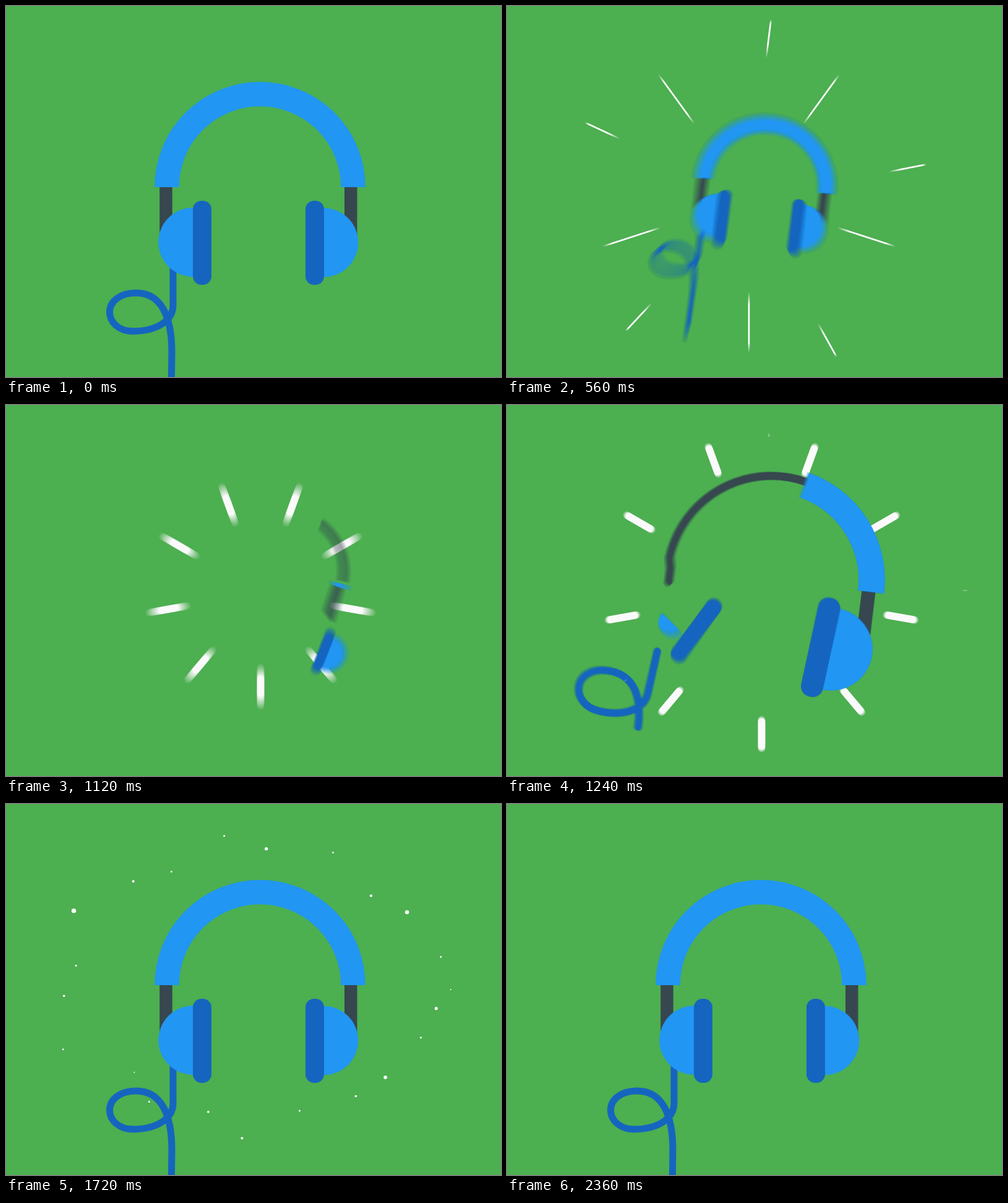
Recreate the animation shown at these times as an HTML page with a canvas. Size 800 by 600 pixels, loop 2400 ms.

```html
<!DOCTYPE html>
<html lang="en">
<head>
<meta charset="utf-8">
<title>Headphones</title>
<style>
  html, body { margin: 0; width: 100%; height: 100%; overflow: hidden; background: #4caf50; }
  canvas { display: block; width: 800px; height: 600px; }
</style>
</head>
<body>
<canvas id="stage" width="800" height="600"></canvas>
<script>
const LOOP = 2400, STEP = 40, SHUTTER = 20, SETTLE = 380, GROW = 250;
const EXIT = 400, ENTER = 1000, REST = 1580;
const GREEN = '#4caf50', BLUE = '#2196f3', NAVY = '#1565c0', SLATE = '#37474f', WHITE = '#fafafa';
const RAD = Math.PI / 180;

const view = document.getElementById('stage').getContext('2d');
const layer = document.createElement('canvas');
layer.width = 800;
layer.height = 600;
const ctx = layer.getContext('2d');

// Each part springs from a shifted, tilted start to its resting place.
const BAND = { x: 410.5, y: 293, start: 1060, back: 1.72, power: 2, tilt: 25, shift: [60, -36] };
const RIGHT_EAR = { x: 499, y: 383, start: 1080, back: 2.8, power: 1.3, tilt: 25, shift: [16, 18] };
const LEFT_PAD = { x: 317, y: 383, start: 1149, back: 2.3, power: 1.75, tilt: 59, shift: [-18, -30] };
const LEFT_CUP = { x: 302, y: 382.5, start: 1200, back: 1.2, power: 4, tilt: -70, shift: [-56, -48] };
const CORD = { x: 264, y: 505, start: 1110, swell: .14, power: 1.2, tilt: 21, shift: [-79, -30] };

const CORD_PATH = new Path2D('M270 420V484C270 508 245 526 205 526C182 526 167.5 511 167.5 495' +
  'C167.5 478 184 464 210 464C252 464 268 504 268 560L266.5 667');

const clamp = u => Math.min(Math.max(u, 0), 1);
const progress = (t, start, span) => clamp((t - start) / span);
const smooth = u => u * u * (3 - 2 * u);
const easeOut = (u, power) => 1 - (1 - u) ** power;
const random = seed => {
  const n = Math.sin(seed * 12.9898) * 43758.5453;
  return n - Math.floor(n);
};

function place({ x, y, start, back, swell, power, tilt, shift }, t, draw) {
  if (t <= start) return;
  const left = 1 - progress(t, start, SETTLE), lag = left ** power;
  const size = swell ? 1 + swell * lag : 1 - (back + 1) * left ** 3 + back * left ** 2;
  ctx.save();
  ctx.translate(x + shift[0] * lag, y + shift[1] * lag);
  ctx.rotate(tilt * lag * RAD);
  ctx.scale(size, size);
  draw();
  ctx.restore();
}

function stroke(color, width, cap, path) {
  ctx.strokeStyle = color;
  ctx.lineWidth = width;
  ctx.lineCap = cap;
  path ? ctx.stroke(path) : ctx.stroke();
}

// Strokes only the first part of a path, up to the given length.
function partialStroke(length, ...style) {
  if (length <= 0) return;
  ctx.setLineDash([length, 2000]);
  stroke(...style);
  ctx.setLineDash([]);
}

function band(now) {
  ctx.fillStyle = SLATE;
  ctx.fillRect(136.5, -2, 20.5, 88);

  ctx.beginPath();
  ctx.arc(0, 0, 156, -.15, .1 - Math.PI, true);
  ctx.lineTo(-152, 0);
  ctx.lineTo(-152, 82);
  const width = 12 + 8.5 * smooth(progress(now, 1380, 140));
  partialStroke(560 * easeOut(progress(now, 1080, GROW), 2), SLATE, width, 'round');

  ctx.beginPath();
  ctx.arc(0, 0, 150.5, 0, -Math.PI * smooth(progress(now, 1090, 330)), true);
  stroke(BLUE, 39.5, 'butt');
}

function cord(now) {
  ctx.translate(-CORD.x, -CORD.y);
  partialStroke(500 * easeOut(progress(now, 1120, GROW), 2), NAVY, 11, 'round', CORD_PATH);
}

function cup(x, isLeft) {
  ctx.fillStyle = BLUE;
  ctx.beginPath();
  ctx.arc(x, -.5, 55.7, -Math.PI / 2, Math.PI / 2, isLeft);
  ctx.fill();
}

function pad() {
  ctx.fillStyle = NAVY;
  ctx.beginPath();
  ctx.roundRect(-15, -68, 30, 136, 14);
  ctx.fill();
}

function headphones(t, now) {
  const leaving = now < ENTER;
  const u = leaving ? progress(t, EXIT, 390) : 0;
  const gone = u < .5 ? 2 * u * u : 1 - 2 * (1 - u) ** 2;
  if (gone > .995) return;
  if (leaving) t = now = LOOP;
  ctx.save();
  ctx.translate(428.8, 291.5);
  ctx.rotate(21 * gone * RAD);
  ctx.scale(1 - gone, 1 - gone);
  ctx.translate(-428.8, -291.5);
  place(BAND, t, () => band(now));
  place(CORD, t, () => cord(now));
  place(LEFT_CUP, t, () => cup(0, true));
  place(LEFT_PAD, t, pad);
  place(RIGHT_EAR, t, () => { cup(14.5, false); pad(); });
  ctx.restore();
}

function rays(x, y, count, angle, inner, outer, width, color, cap) {
  ctx.beginPath();
  for (let i = 0; i < count; i++) {
    const a = (angle + i * 360 / count) * RAD, dx = Math.cos(a), dy = Math.sin(a);
    ctx.moveTo(x + inner * dx, y + inner * dy);
    ctx.lineTo(x + outer * dx, y + outer * dy);
  }
  stroke(color, width, cap);
}

// The inner ends run ahead while the outer ends speed up behind them.
function inwardRays(age, angle) {
  const outer = 300 - .003 * age * age, inner = Math.max(300 - age, 40);
  if (age > 0 && outer > inner) rays(391, 312, 5, angle, inner, outer, 2.7, '#fff', 'butt');
}

function outwardRays(t, now) {
  const u = progress(t, 1040, 400);
  if (u === 0 || u === 1) return;
  const inner = 220.5 * easeOut(u, 4);
  const width = 12 * (1 - smooth(progress(now, 1240, 200)));
  rays(411.5, 304, 9, 90, inner, inner + 43, width, WHITE, 'round');
}

// Dots drift in towards a ring around the headphones, swell and fade away.
function dots(t) {
  const count = 22, life = 800;
  ctx.fillStyle = WHITE;
  for (let i = 0; i < count; i++) {
    const age = t - 1200 - 360 * i / count;
    if (age <= 0 || age >= life) continue;
    const angle = i * 137.5 * RAD, spread = random(i + 1);
    const drift = 1 + .12 * (1 - progress(age, 0, 160)) ** 2;
    const x = 395 + (250 + 80 * spread) * drift * Math.cos(angle);
    const y = 300 + (195 + 60 * spread) * drift * Math.sin(angle);
    const peak = 1.6 + 3.8 * random(i + 50) ** 2;
    ctx.beginPath();
    ctx.arc(x, y, peak * Math.sin(Math.PI * Math.sqrt(age / life)), 0, 2 * Math.PI);
    ctx.fill();
  }
}

function scene(t, now) {
  ctx.fillStyle = GREEN;
  ctx.fillRect(0, 0, 800, 600);
  outwardRays(t, now);
  headphones(t, now);
  inwardRays(t - 420, 90);
  inwardRays(t - 500, -11);
  dots(t);
}

// Averages several moments within the shutter; growing strokes stay sharp.
function render(now) {
  const samples = now < EXIT || now > REST ? 1 : 16;
  for (let i = 0; i < samples; i++) {
    scene(now + ((i + .5) / samples - .5) * SHUTTER, now);
    view.globalAlpha = 1 / (i + 1);
    view.drawImage(layer, 0, 0);
  }
}

const begin = performance.now();
let shown = -1;
function tick() {
  const now = Math.floor((performance.now() - begin) % LOOP / STEP) * STEP;
  if (now !== shown) render(shown = now);
  requestAnimationFrame(tick);
}
tick();
</script>
</body>
</html>
```
